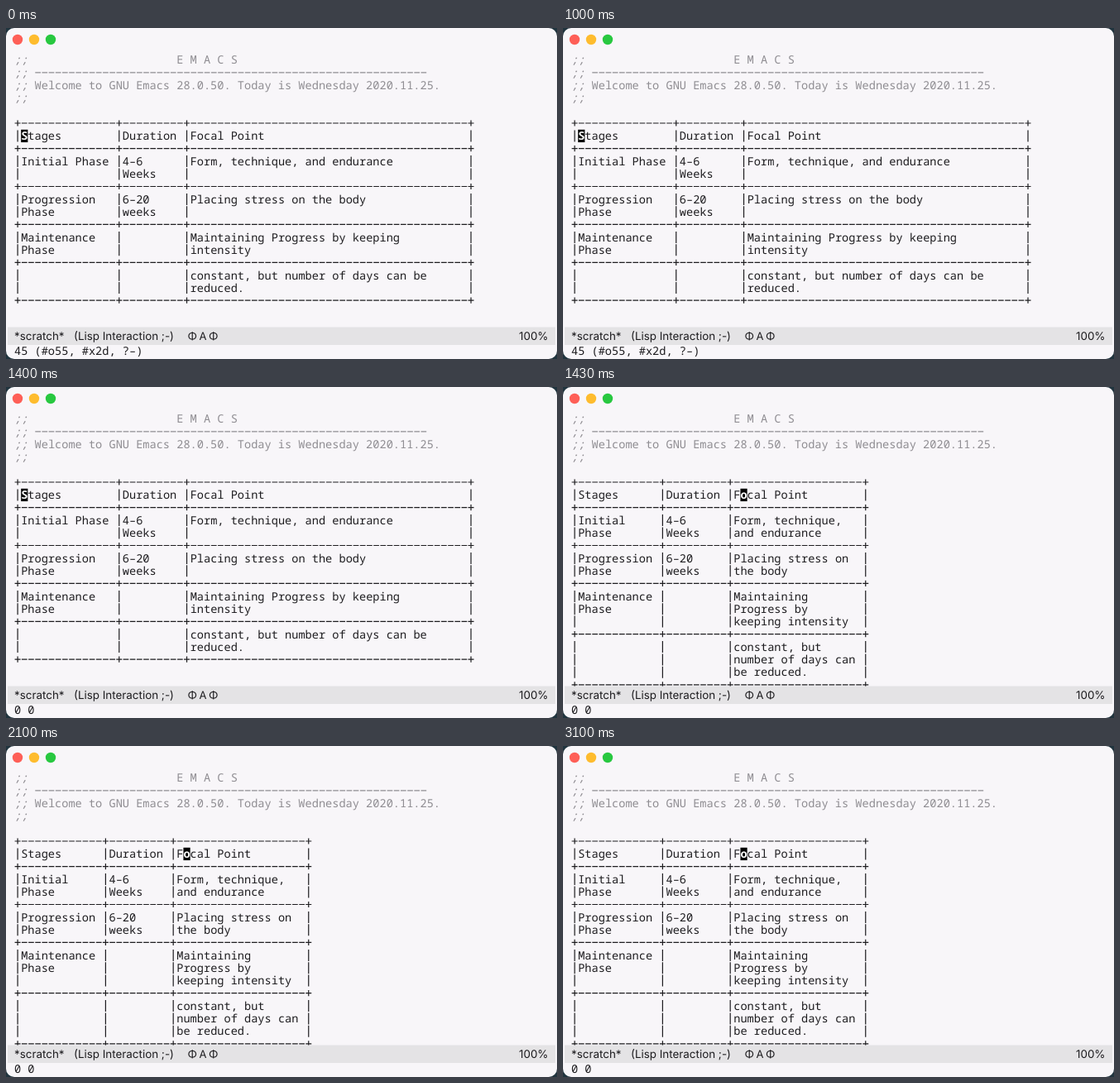
Animation, 666 px wide and 400 px high, one loop 3710 ms. Source, as an HTML page:

```html
<!DOCTYPE html>
<html lang="en">
<head>
<meta charset="utf-8">
<title>Table resize</title>
<style>
  html, body { margin: 0; width: 100%; height: 100%; overflow: hidden; background: #20343e; }
  svg { display: block; text-rendering: geometricPrecision; }
  text { white-space: pre; fill: #1d1c1f; }
  .mono { font: 13.63px "Noto Sans Mono", "DejaVu Sans Mono", monospace; }
  .ui { font: 13.4px Inter, "Liberation Sans", sans-serif; }
  .note, .note text { fill: #8f8d92; }
  .slant { font-style: italic; }
  .cursor { fill: #fff; font-weight: 600; }
  .grid { fill: none; stroke: #1d1c1f; stroke-width: 1.2; }
  .dash { fill: none; stroke-width: 1.2; stroke-dasharray: 6.7 1.48; }

  .first, .later { animation: 3710ms step-end infinite; }
  .later { visibility: hidden; }
  .echo.first { animation-name: hideEcho; }
  .echo.later { animation-name: showEcho; }
  .table.first { animation-name: hideTable; }
  .table.later { animation-name: showTable; }
  /* echo switches at 1400 ms, table at 1430 ms */
  @keyframes hideEcho { 0% { visibility: visible; } 37.736%, 100% { visibility: hidden; } }
  @keyframes showEcho { 0% { visibility: hidden; } 37.736%, 100% { visibility: visible; } }
  @keyframes hideTable { 0% { visibility: visible; } 38.544%, 100% { visibility: hidden; } }
  @keyframes showTable { 0% { visibility: hidden; } 38.544%, 100% { visibility: visible; } }
</style>
</head>
<body>
<svg id="stage" width="666" height="400" viewBox="0 0 666 400">
  <rect width="666" height="400" rx="10" fill="#f8f6f9"/>
  <circle cx="14" cy="14" r="6.2" fill="#fe5f57"/>
  <circle cx="34" cy="14" r="6.2" fill="#febc2e"/>
  <circle cx="54" cy="14" r="6.2" fill="#28c840"/>
  <g id="header" class="mono note"></g>
  <g id="wide" class="mono table first"></g>
  <g id="narrow" class="mono table later"></g>
  <rect x="2" y="361.5" width="662" height="21.5" fill="#e4e3e5"/>
  <g class="ui">
    <text x="10" y="377">*scratch*</text>
    <text x="82" y="377">(Lisp Interaction ;-)</text>
    <text x="219.5" y="377" font-size="13" letter-spacing="2.6">ΦAΦ</text>
    <text x="655.5" y="377" text-anchor="end">100%</text>
  </g>
  <g class="mono">
    <text class="echo first" x="10" y="395.4">45 (#o55, #x2d, ?–)</text>
    <text class="echo later" x="10" y="395.4">0 0</text>
  </g>
</svg>
<script>
  const NS = "http://www.w3.org/2000/svg";
  const CELL = 8.178, LINE = 15.3, LEFT = 10, TOP = 38.5;
  const colX = c => LEFT + c * CELL;
  const rowY = r => TOP + r * LINE;

  function add(parent, tag, attrs, content) {
    const el = document.createElementNS(NS, tag);
    for (const k in attrs) el.setAttribute(k, attrs[k]);
    if (content) el.textContent = content;
    parent.appendChild(el);
  }

  function write(parent, col, row, str, cls = "") {
    add(parent, "text", { x: colX(col), y: rowY(row) + 4.9, class: cls }, str);
  }

  function dashes(parent, col, row, count, color) {
    add(parent, "path", {
      class: "dash", stroke: color,
      d: `M${colX(col) + 0.74} ${rowY(row)}h${count * CELL - 1.4}`
    });
  }

  // Each group is a list of lines, each line a list of cells.
  function drawTable(id, widths, groups, cursor) {
    const g = document.getElementById(id);
    const bars = [0];
    for (const w of widths) bars.push(bars[bars.length - 1] + w + 1);
    let row = 5, path = "";

    const border = () => {
      widths.forEach((w, i) => dashes(g, bars[i] + 1, row, w, "#1d1c1f"));
      for (const b of bars) {
        const x = colX(b + 0.5), y = rowY(row);
        path += `M${x - 3.5} ${y}h7M${x} ${y - 3.6}v7.2`;
      }
      row++;
    };

    border();
    for (const lines of groups) {
      for (const cells of lines) {
        for (const b of bars) path += `M${colX(b + 0.5)} ${rowY(row) - 6.8}v14`;
        cells.forEach((s, i) => s && write(g, bars[i] + 1, row, s));
        row++;
      }
      border();
    }
    add(g, "path", { class: "grid", d: path });

    add(g, "rect", { x: colX(cursor.col), y: rowY(6) - 7.5, width: CELL, height: LINE, fill: "#000" });
    write(g, cursor.col, 6, cursor.ch, "cursor");
  }

  const header = document.getElementById("header");
  for (let r = 0; r < 4; r++) write(header, 0, r, ";;", "slant");
  write(header, 24, 0, "E M A C S");
  dashes(header, 3, 1, 58, "#8f8d92");
  write(header, 3, 2, "Welcome to GNU Emacs 28.0.50. Today is Wednesday 2020.11.25.");

  const titles = [["Stages", "Duration", "Focal Point"]];

  drawTable("wide", [14, 9, 41], [
    titles,
    [["Initial Phase", "4–6", "Form, technique, and endurance"], ["", "Weeks", ""]],
    [["Progression", "6–20", "Placing stress on the body"], ["Phase", "weeks", ""]],
    [["Maintenance", "", "Maintaining Progress by keeping"], ["Phase", "", "intensity"]],
    [["", "", "constant, but number of days can be"], ["", "", "reduced."]]
  ], { col: 1, ch: "S" });

  drawTable("narrow", [12, 9, 19], [
    titles,
    [["Initial", "4–6", "Form, technique,"], ["Phase", "Weeks", "and endurance"]],
    [["Progression", "6–20", "Placing stress on"], ["Phase", "weeks", "the body"]],
    [["Maintenance", "", "Maintaining"], ["Phase", "", "Progress by"], ["", "", "keeping intensity"]],
    [["", "", "constant, but"], ["", "", "number of days can"], ["", "", "be reduced."]]
  ], { col: 25, ch: "o" });
</script>
</body>
</html>
```
